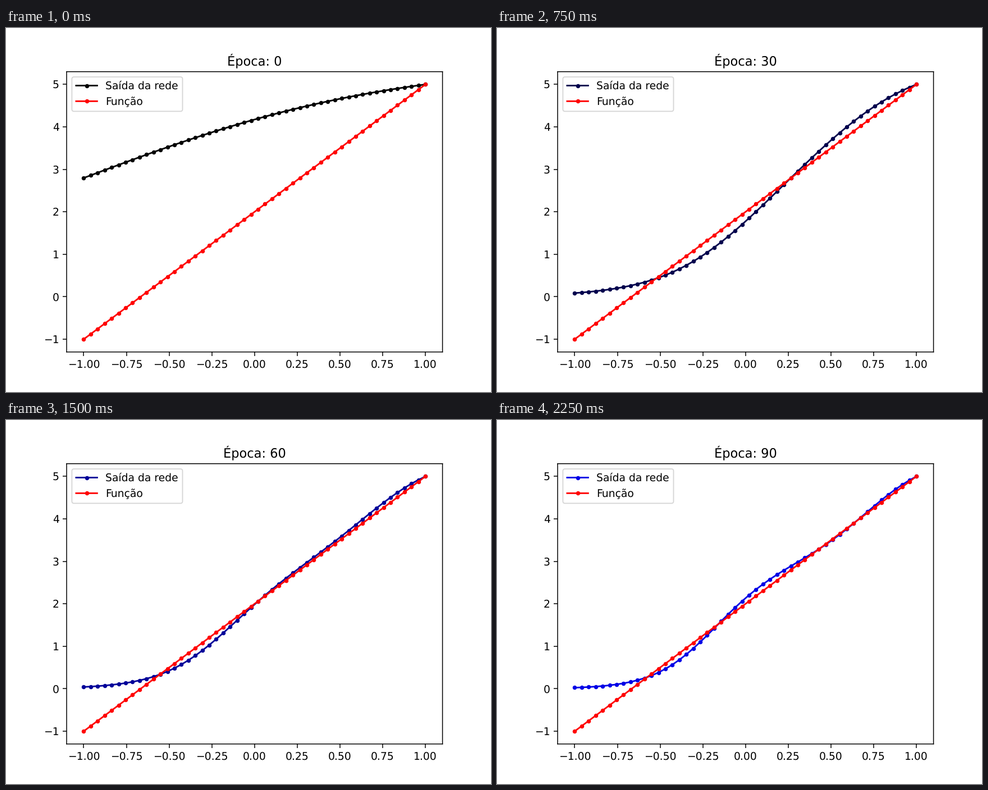
A matplotlib script for the animation above (2500 ms loop, 864x648 px).

```python
import numpy as np
import matplotlib.pyplot as plt
from matplotlib.animation import FuncAnimation

# Unhinted text and unsnapped paths keep everything at sub-pixel positions
plt.rcParams.update({
    "font.family": "DejaVu Sans",
    "text.hinting": "none",
    "path.snap": False,
})

EPOCHS_PER_FRAME = 10
OUTPUT_MAX = 5
OUTPUT_LEVEL = 0.9  # sigmoid level that stands for OUTPUT_MAX

x = np.linspace(-1, 1, 50)
target = 3 * x + 2


def sigmoid(z):
    return 1 / (1 + np.exp(-z))


def network_output(epoch):
    """Sigmoid of a straight ramp that bends more as training goes on."""
    started = 1 - np.exp(-epoch)  # the first epochs change the fit abruptly
    trained = sigmoid((epoch - 52.5) / 15)

    left = 0.014 - started * (3.86 + 1.65 * trained)
    right = np.log(OUTPUT_LEVEL / (1 - OUTPUT_LEVEL))
    u = (x + 1) / 2
    bend = (1.04 * trained * np.sin(np.pi * u)
            + (0.42 * trained - 0.03) * np.sin(2 * np.pi * u)
            - 0.167 * trained * np.sin(3 * np.pi * u))

    ramp = left + (right - left) * u
    return OUTPUT_MAX / OUTPUT_LEVEL * sigmoid(ramp + started * bend)


fig, ax = plt.subplots(figsize=(6.4, 4.8), dpi=135)


def draw(step):
    epoch = EPOCHS_PER_FRAME * step
    ax.clear()
    ax.plot(x, network_output(epoch), ".-", color=(0, 0, epoch / 100), label="Saída da rede")
    ax.plot(x, target, ".-", color="red", label="Função")
    ax.set_title(f"Época: {epoch}")
    ax.legend(loc="upper left")


anim = FuncAnimation(fig, draw, frames=10, interval=250, repeat=True, repeat_delay=0)
plt.show()
```
